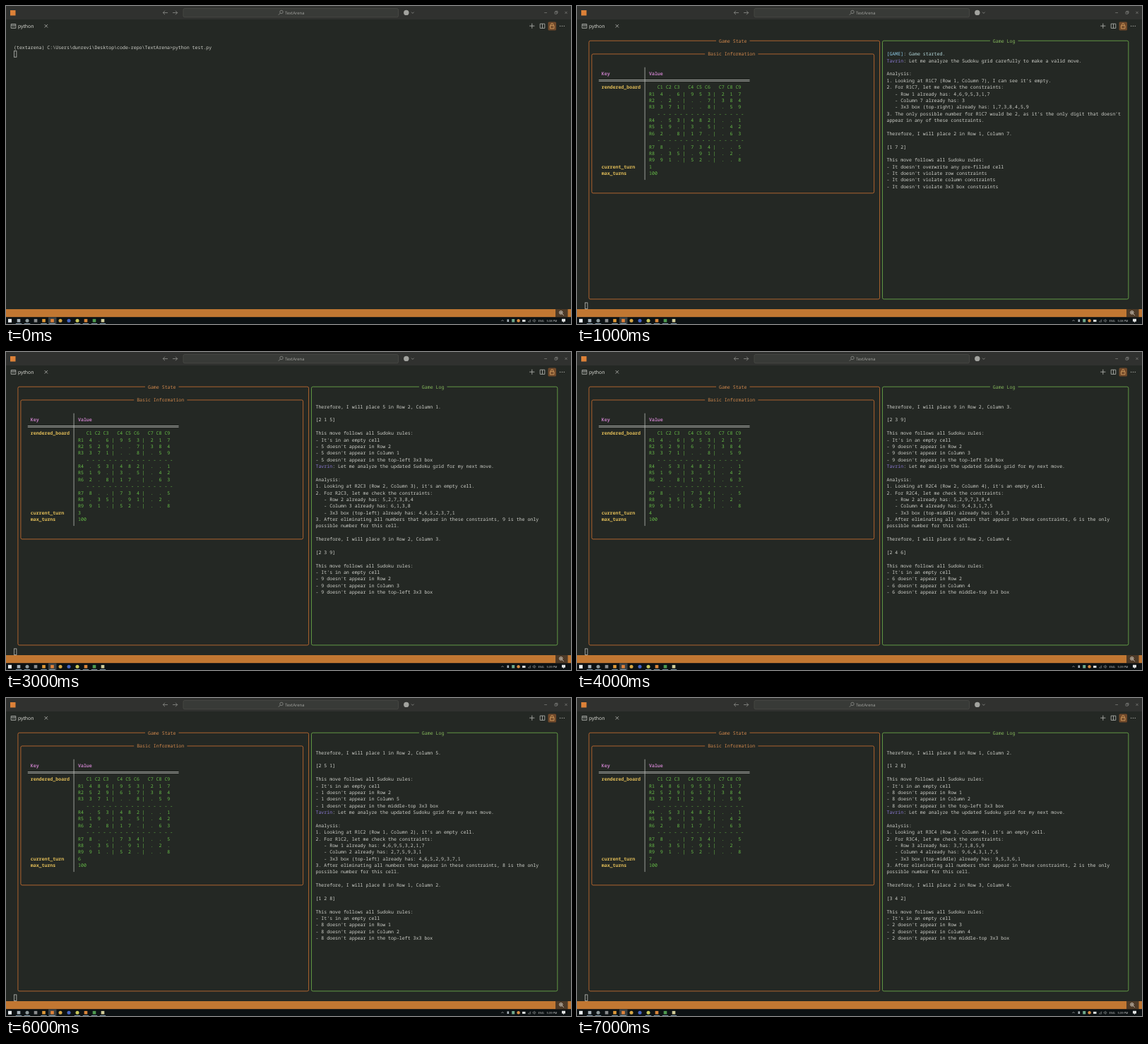
Recreate the animation shown at these times as an HTML page. Size 800x450 px, loop 8000 ms.

```html
<!DOCTYPE html>
<html lang="en">
<head>
<meta charset="utf-8">
<title>Sudoku terminal</title>
<style>
html, body { margin: 0; width: 100%; height: 100%; overflow: hidden; background: #242824; }
svg { display: block; width: 800px; height: 450px; }
text { white-space: pre; text-rendering: geometricPrecision; }
.mono { font-family: "Noto Sans Mono", monospace; font-size: 6.597px; }
.ui { font-family: "Open Sans", sans-serif; }
.line { fill: none; stroke: #b9bab6; stroke-width: .8; }
</style>
</head>
<body>
<svg id="stage" viewBox="0 0 800 450" xmlns="http://www.w3.org/2000/svg"></svg>
<script>
const STEP = 1000, LOOP = 8000;
const CW = 3.958, LH = 9.375, X0 = 11, Y0 = 49.2;
const INK = '#cfd0ca', ORANGE = '#bd6a30', GREEN = '#67bd48', LIME = '#68a448',
      YELLOW = '#e2bd58', PINK = '#c17cc0', VIOLET = '#8878cf', CYAN = '#8cc8e4';

const colX = c => X0 + c * CW;
const rowY = r => Y0 + r * LH;
const put = (c, r, s, fill = INK, bold = false) =>
  `<text x="${colX(c)}" y="${rowY(r) + 2.3}" fill="${fill}"${bold ? ' font-weight="700"' : ''}>${s}</text>`;
const rect = (x, y, w, h, fill, more = '') =>
  `<rect x="${x}" y="${y}" width="${w}" height="${h}" fill="${fill}" ${more}/>`;
const dot = (x, y, r, fill) => `<circle cx="${x}" cy="${y}" r="${r}" fill="${fill}"/>`;
const line = (d, more = '') => `<path class="line" d="${d}" ${more}/>`;
const label = (x, y, size, s, fill, anchor = 'start') =>
  `<text class="ui" x="${x}" y="${y}" font-size="${size}" fill="${fill}" text-anchor="${anchor}">${s}</text>`;

// Window chrome, status bar and taskbar

function chrome() {
  const icons = [
    [18, '#a9b4bc', 0], [30, '#8f9a9c', 1], [42, '#8b8d8e', 0], [53.5, '#dd9838', 0],
    [65.5, '#e0833a', 0], [77, '#d5a646', 1], [89, '#4666c4', 1], [101, '#c8c85a', 1],
    [113, '#d9853a', 0], [125, '#4d9a50', 0], [137, '#cfcb98', 0]];
  const running = [18, 30, 53.5, 65.5, 101, 113, 125, 137];
  return rect(0, 0, 800, 450, '#242824') +
    rect(0, 0, 800, 19, '#30312f') +
    rect(6, 6, 7.5, 7.5, '#dc8138') +
    line('M229 9.5H222.3M225 6.8L222.3 9.5L225 12.2M236 9.5H242.7M240 6.8L242.7 9.5L240 12.2', 'style="stroke:#8d8e8b"') +
    rect(251, 3.5, 304.5, 12.3, '#383a37', 'rx="2" stroke="#4c4e4a" stroke-width=".7"') +
    '<circle class="line" cx="390" cy="8.4" r="2.2" style="stroke:#8d8e8b"/>' +
    line('M388.4 10L385.8 12.7', 'style="stroke:#8d8e8b"') +
    label(395, 11.9, 5.9, 'TextArena', '#a2a39f') +
    dot(566.8, 9.4, 3.7, '#a2a39f') +
    line('M574 8.6L575.8 10.4L577.6 8.6', 'style="stroke:#8d8e8b"') +
    line('M762.2 9.5H766M777 8.3H780V11.2H777ZM778 8.3V7.3H781V10.2H780M791.4 7.8L794.6 11M794.6 7.8L791.4 11', 'style="stroke:#90918e;stroke-width:.6"') +
    line('M7.2 25.6H13.8V31.4H7.2ZM7.2 27.3H13.8M9 29.2H10M11 29.2H12') +
    label(17, 31, 6.8, 'python', '#e4e5df') +
    line('M54.6 26.1L59 30.5M59 26.1L54.6 30.5') +
    line('M741.2 28.2H748.4M744.8 24.6V31.8M756.2 25.2H762.8V31.4H756.2ZM759.5 25.2V31.4') +
    rect(767.5, 22.5, 11.5, 12, '#70492a', 'rx="1.5"') +
    line('M770.5 27.8H776V31.8H770.5ZM771.6 27.8V26.3A1.65 1.65 0 0 1 774.9 26.3V27.8', 'style="stroke:#e0a765"') +
    [784.6, 787.4, 790.2].map(x => dot(x, 28.3, .65, '#c9cac5')).join('') +
    rect(0, 429, 800, 11.5, '#c17732') +
    rect(778, 429, 17.5, 11.5, '#4d3a28') +
    '<circle class="line" cx="785.8" cy="433.8" r="2.3" style="stroke:#e6e0d6"/>' +
    line('M787.5 435.6L789.7 437.8M784.6 433.8H787M785.8 432.6V435', 'style="stroke:#e6e0d6"') +
    rect(0, 440.3, 800, 9.7, '#0c1113') +
    rect(60, 440.3, 11.5, 9.7, '#3b4042') +
    rect(3, 442.8, 5, 5, '#e8ecee') +
    icons.map(([x, fill, round]) => round
      ? dot(x, 445.2, 2.5, fill)
      : rect(x - 2.3, 442.9, 4.6, 4.6, fill)).join('') +
    running.map(x => rect(x - 4.2, 449.1, 8.4, .9, '#8fa9ba')).join('') +
    line('M701.4 446L703 444.4L704.6 446', 'style="stroke:#d6d8d8;stroke-width:.6"') +
    rect(709.5, 443.4, 2.6, 3.6, '#a9b3ba') +
    rect(716.2, 443, 4, 4.4, '#6fa98b') +
    dot(725.6, 445.3, 2.2, '#d68d43') +
    rect(731, 443.9, 4.5, 3, '#d9dcdc') +
    line('M739.4 447H742.6V443.8ZM746 444.5H747L748.4 443.3V447.3L747 446.1H746ZM749.4 444A2 2 0 0 1 749.4 446.6', 'style="stroke:#a5a8a9;stroke-width:.5"') +
    label(757.6, 446.9, 4, 'ENG', '#d3d5d5', 'middle') +
    '<text id="clock" class="ui" x="773" y="446.9" font-size="4" fill="#d3d5d5" text-anchor="middle"></text>' +
    '<path d="M787 442.8H792V446.6H790.4L789.4 448L788.6 446.6H787Z" fill="#e2e4e4"/>';
}

// Panels

function panel(c0, c1, r0, r1, title, at, color) {
  const [l, r, t, b] = [colX(c0 + .5), colX(c1 + .5), rowY(r0), rowY(r1)], k = 2;
  const d = `M${colX(at - 1)} ${t}H${l + k}Q${l} ${t} ${l} ${t + k}V${b - k}Q${l} ${b} ${l + k} ${b}` +
    `H${r - k}Q${r} ${b} ${r} ${b - k}V${t + k}Q${r} ${t} ${r - k} ${t}H${colX(at + title.length + 1)}`;
  return `<path d="${d}" fill="none" stroke="${color}" stroke-width=".9"/>` +
    put(at, r0, title, color === LIME ? '#86b95c' : '#d0874c');
}

function panels() {
  const y = rowY(6), bar = colX(21.5);
  return panel(1, 105, 0, 39, 'Game State', 48, ORANGE) +
    panel(2, 103, 2, 23, 'Basic Information', 44, ORANGE) +
    panel(106, 194, 0, 39, 'Game Log', 146, LIME) +
    put(6, 5, 'Key', PINK, true) + put(23, 5, 'Value', PINK, true) +
    put(6, 7, 'rendered_board', YELLOW, true) +
    put(6, 19, 'current_turn', YELLOW, true) +
    put(6, 20, 'max_turns', YELLOW, true) +
    put(23, 20, '100', GREEN) +
    line(`M${colX(5)} ${y - .9}H${colX(59)}M${colX(5)} ${y + .9}H${colX(59)}M${bar} ${rowY(4)}V${rowY(21)}`);
}

// Game data

const START = ['4.6953.17', '.2...7384', '371..8.59', '.53482..1', '19.3.5.42',
               '2.817..63', '8..734..5', '.35.91.2.', '91.52...8'];
const MOVES = [
  { r: 1, c: 7, n: 2, row: '4,6,9,5,3,1,7', col: '3', box: '1,7,3,8,4,5,9', at: 'top-right' },
  { r: 2, c: 1, n: 5, row: '2,7,3,8,4', col: '4,3,1,2,8,9', box: '4,6,3,7,1', at: 'top-left' },
  { r: 2, c: 3, n: 9, row: '5,2,7,3,8,4', col: '6,1,3,8', box: '4,6,5,2,3,7,1', at: 'top-left' },
  { r: 2, c: 4, n: 6, row: '5,2,9,7,3,8,4', col: '9,4,3,1,7,5', box: '9,5,3', at: 'top-middle' },
  { r: 2, c: 5, n: 1, row: '5,2,9,6,7,3,8,4', col: '5,8,7,9,2,3', box: '9,5,3,6', at: 'top-middle' },
  { r: 1, c: 2, n: 8, row: '4,6,9,5,3,2,1,7', col: '2,7,5,9,3,1', box: '4,6,5,2,9,3,7,1', at: 'top-left' },
  { r: 3, c: 4, n: 2, row: '3,7,1,8,5,9', col: '9,6,4,3,1,7,5', box: '9,5,3,6,1', at: 'top-middle' }
];
const BOT = 'Tavrin';
const tint = (s, color) => `<tspan fill="${color}">${s}</tspan>`;

function verdict(i) {
  const { r, c, n, at } = MOVES[i];
  const side = at === 'top-middle' ? 'middle-top' : at;
  const rules = i
    ? ["It's in an empty cell", ...[`Row ${r}`, `Column ${c}`, `the ${side} 3x3 box`].map(s => `${n} doesn't appear in ${s}`)]
    : ["It doesn't overwrite any pre-filled cell", ...['row', 'column', '3x3 box'].map(s => `It doesn't violate ${s} constraints`)];
  return [`Therefore, I will place ${n} in Row ${r}, Column ${c}.`, '', `[${r} ${c} ${n}]`, '',
    'This move follows all Sudoku rules:', ...rules.map(s => '- ' + s)];
}

function analysis(i) {
  const { r, c, n, row, col, box, at } = MOVES[i], cell = `R${r}C${c}`;
  const intro = i ? 'Let me analyze the updated Sudoku grid for my next move.'
                  : 'Let me analyze the Sudoku grid carefully to make a valid move.';
  const found = i ? "it's an empty cell." : "I can see it's empty.";
  const why = i
    ? [`3. After eliminating all numbers that appear in these constraints, ${n} is the only`, 'possible number for this cell.']
    : [`3. The only possible number for ${cell} would be ${n}, as it's the only digit that doesn't`, 'appear in any of these constraints.'];
  return [tint(BOT, VIOLET) + ': ' + intro, '', 'Analysis:',
    `1. Looking at ${cell} (Row ${r}, Column ${c}), ${found}`,
    `2. For ${cell}, let me check the constraints:`,
    `   - Row ${r} already has: ${row}`,
    `   - Column ${c} already has: ${col}`,
    `   - 3x3 box (${at}) already has: ${box}`,
    ...why, ''];
}

function board(turn) {
  const cells = START.map(s => [...s]);
  for (const { r, c, n } of MOVES.slice(0, turn)) cells[r - 1][c - 1] = n;
  const rows = cells.map((a, i) => `R${i + 1}  ` +
    [0, 3, 6].map(k => a.slice(k, k + 3).join('  ')).join(' |  '));
  const rule = '   ' + Array(16).fill('-').join(' ');
  return ['   C1 C2 C3   C4 C5 C6   C7 C8 C9', ...rows.slice(0, 3), rule,
    ...rows.slice(3, 6), rule, ...rows.slice(6), turn];
}

function game(turn) {
  const i = turn - 1;
  const head = i ? ['', ...verdict(i - 1)]
                 : [tint('[GAME]', CYAN) + ': ' + tint('Game started.', '#b4d9dc')];
  const log = [...head, ...analysis(i), ...verdict(i)];
  return panels() +
    board(turn).map((s, k) => put(23, 7 + k, s, GREEN)).join('') +
    log.map((s, k) => put(108, 2 + k, s)).join('');
}

const prompt = () =>
  put(0, 1, '(textarena) C:\\Users\\dunrevi\\Desktop\\code-repo\\TextArena&gt;python test.py');

const cursor = r =>
  `<rect class="line" x="${X0 + .4}" y="${rowY(r) - 4.3}" width="3.5" height="8.6"/>`;

// Playback

const stage = document.getElementById('stage');
stage.innerHTML = chrome() + '<g id="term" class="mono"></g>';
const term = document.getElementById('term');
const clock = document.getElementById('clock');
let shown = -1;

function draw(ms) {
  const turn = Math.floor((ms % LOOP) / STEP);
  if (turn === shown) return;
  shown = turn;
  term.innerHTML = turn ? game(turn) + cursor(40) : prompt() + cursor(2);
  clock.textContent = turn < 2 ? '5:38 PM' : '5:39 PM';
}

const t0 = performance.now();
function tick() {
  draw(performance.now() - t0);
  requestAnimationFrame(tick);
}
tick();
</script>
</body>
</html>
```
